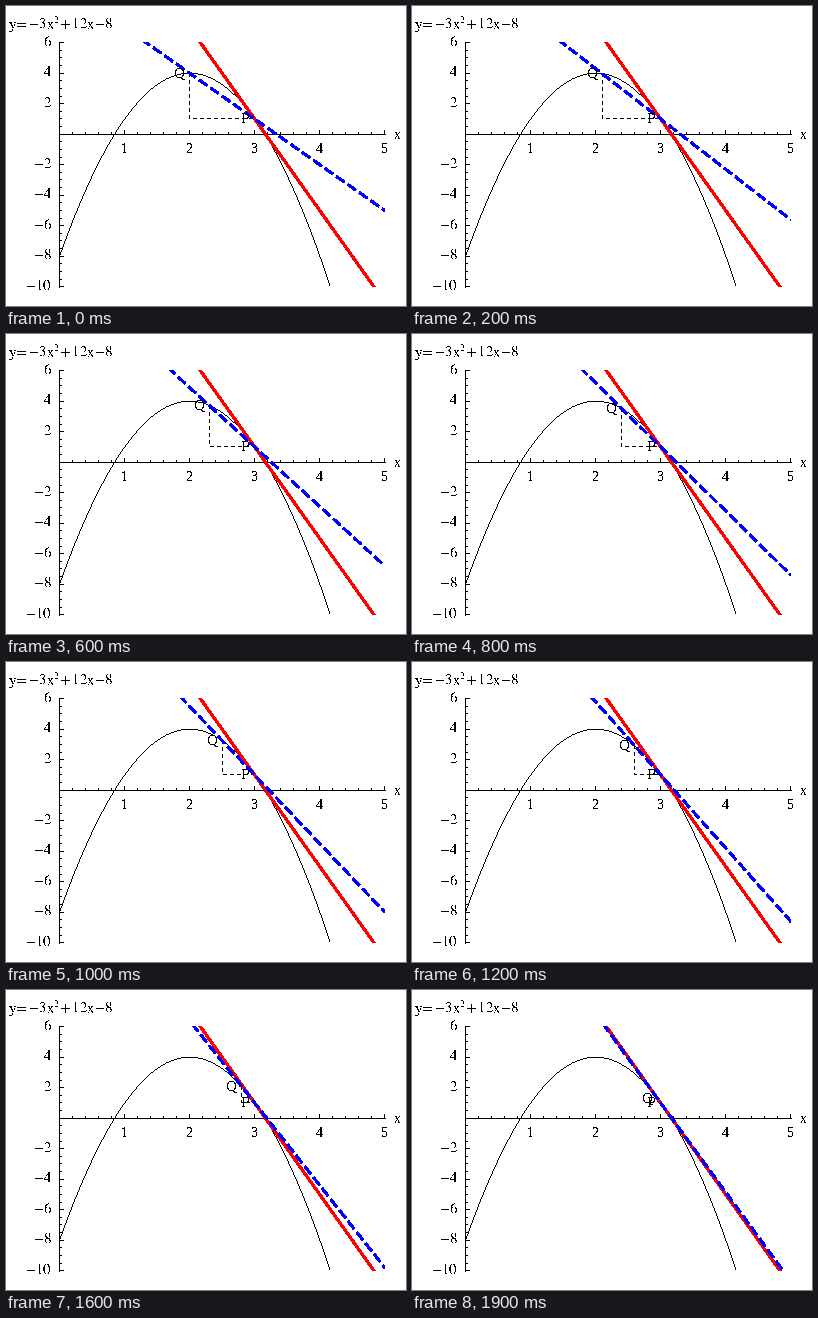
Animation, 400 px wide and 300 px high, one loop 2000 ms. Source, as a matplotlib script:

```python
import numpy as np
import matplotlib.pyplot as plt
from matplotlib.animation import FuncAnimation
from matplotlib.collections import PolyCollection
from matplotlib.patches import Rectangle

W, H, DPI = 400, 300, 100
PX = 72 / DPI
FRAMES, INTERVAL = 20, 100
X_MAX, Y_MIN, Y_MAX = 5, -10, 6
P = 3

plt.rcParams.update({
    "font.family": "Liberation Serif",
    "mathtext.fontset": "stix",
    "text.antialiased": False,
    "text.hinting": "native",
    "text.hinting_factor": 1,
})


def f(x):
    return -3 * x**2 + 12 * x - 8


def sx(x):
    return 53.5 + 65.05 * np.asarray(x, float)


def sy(y):
    return 128.2 - 15.25 * np.asarray(y, float)


fig = plt.figure(figsize=(W / DPI, H / DPI), dpi=DPI, facecolor="white")
ax = fig.add_axes([0, 0, 1, 1])
ax.set(xlim=(0, W), ylim=(H, 0))
ax.axis("off")

window = Rectangle((53, 36), 326, 245, transform=ax.transData)


def line(xs, ys, color="black", width=1.0, **kw):
    art, = ax.plot(xs, ys, color=color, lw=width * PX, antialiased=False,
                   dash_capstyle="butt", solid_capstyle="butt", **kw)
    art.set_clip_path(window)
    return art


def hairline(xs, ys):
    """Draw a curve one pixel thick, one square per step."""
    step = np.maximum(np.abs(np.diff(xs)), np.abs(np.diff(ys)))
    dist = np.concatenate([[0], np.cumsum(step)])
    at = np.arange(0, dist[-1])
    corner = np.floor(np.c_[np.interp(at, dist, xs), np.interp(at, dist, ys)])
    square = np.array([[0.1, 0.1], [0.9, 0.1], [0.9, 0.9], [0.1, 0.9]])
    ax.add_collection(PolyCollection(corner[:, None] + square, color="black",
                                     lw=0, antialiased=False))


def label(x, y, s, ha="center", size=14.5):
    return ax.text(x, y, s, ha=ha, va="baseline", fontsize=size * PX)


def seg(*ends):
    xs, ys = np.floor(ends).reshape(2, 2).T
    ax.plot(xs, ys, color="black", lw=PX, antialiased=False,
            solid_capstyle="butt", snap=True)


def draw_axes():
    x0, y0 = float(sx(0)), float(sy(0))
    seg(53, y0, 379, y0)
    seg(x0, 36, x0, 281)
    for i in range(5 * X_MAX + 1):
        x = float(sx(i / 5))
        major = i % 5 == 0
        seg(x, y0, x, y0 - (4 if major else 2))
        if major and i:
            label(x, 147, str(i // 5))
    for i in range(2 * Y_MIN, 2 * Y_MAX + 1):
        y = float(sy(i / 2))
        major = i % 4 == 0
        seg(x0, y, x0 + (4 if major else 2), y)
        if major and i:
            label(46, y + 4, f"${i // 2}$", ha="right")
    label(391.5, 133, "x")
    label(2, 23, r"$\mathrm{y\!{=}{-}3x^2{+}\,12x{-}8}$", ha="left")


def through_p(slope, x):
    return sx(x), sy(f(P) + slope * (x - P))


draw_axes()
x_end = 2 + np.sqrt((4 - Y_MIN) / 3)
xs = np.linspace(0, x_end, 500)
hairline(sx(xs), sy(f(xs)))
legs = line([], [], dashes=(4, 3))
q_label = label(0, 0, "Q")
label(239.5, 117, "P")
line(*through_p(-6, np.array([0, X_MAX])), color="#ff0000", width=2)
secant = line([], [], color="#0000ff", width=2, dashes=(5, 2.4))


def update(i):
    q = 2 + 0.05 * i
    slope = (f(P) - f(q)) / (P - q)
    # the dashes start where the line enters the window
    top = P + (Y_MAX + 0.2 - f(P)) / slope
    secant.set_data(*through_p(slope, np.array([top, X_MAX])))
    legs.set_data(np.floor(sx([q, q, P])), np.floor(sy([f(q), f(P), f(P)])))
    q_label.set_position((float(sx(q)) - 9.5, float(sy(f(q))) + 4.5))
    return secant, legs, q_label


anim = FuncAnimation(fig, update, frames=FRAMES, interval=INTERVAL,
                     repeat=True, repeat_delay=0, blit=False)
plt.show()
```
